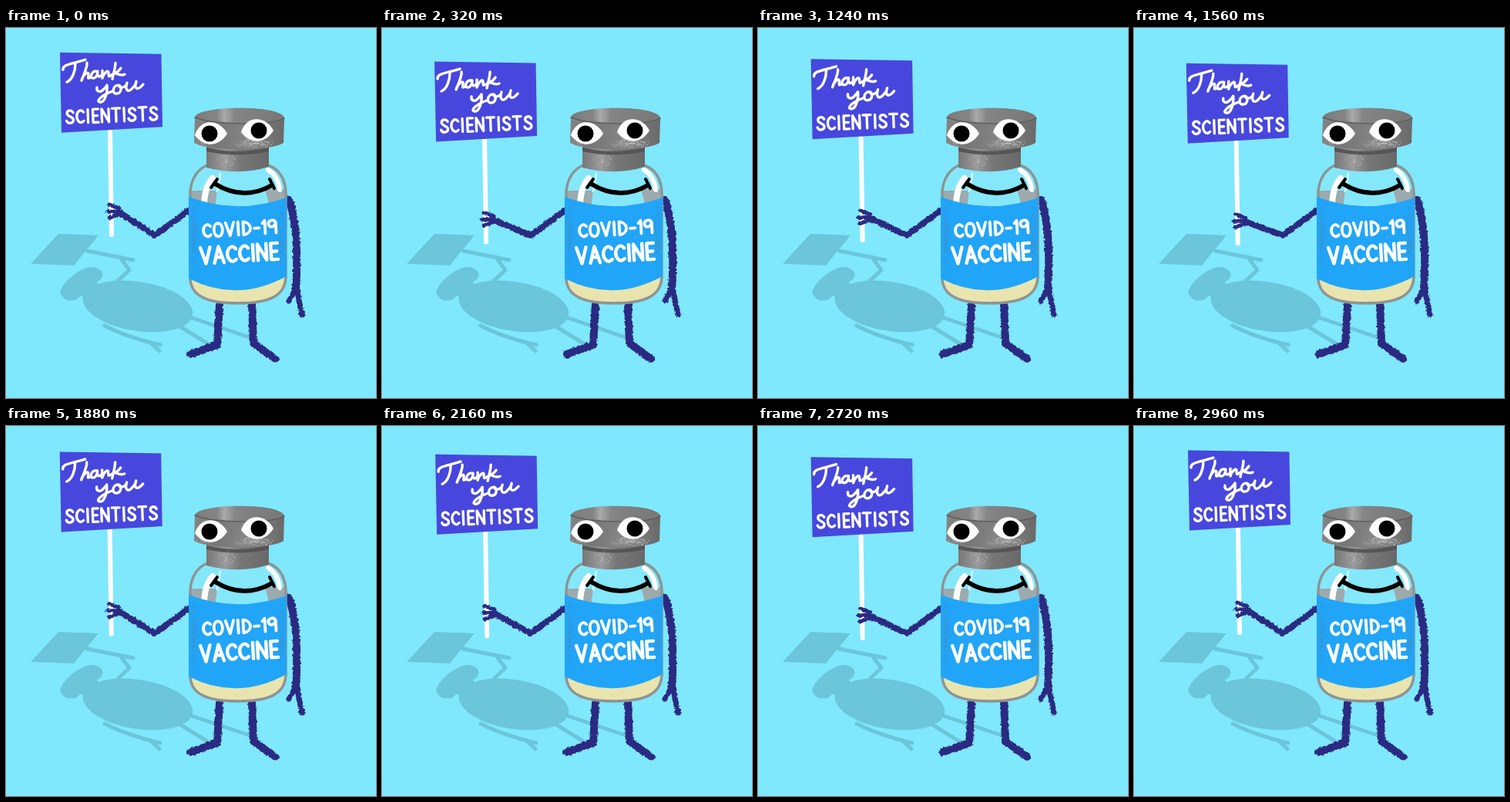
An HTML page for the animation above (3 s loop, 480 by 480 pixels).

```html
<!DOCTYPE html>
<html lang="en">
<head>
<meta charset="utf-8">
<title>Thank you scientists</title>
<style>
html, body { margin: 0; height: 100%; overflow: hidden; background: #7fe8fd; }
svg { display: block; width: 100%; height: 100%; }
.line { fill: none; stroke-linecap: round; stroke-linejoin: round; }
.ink { stroke: #2b2a82; stroke-width: 10; }
.white { stroke: #fff; stroke-width: 3.4; }
.shade { stroke: #6bc6db; stroke-width: 5; }
.letters path { vector-effect: non-scaling-stroke; }
</style>
</head>
<body>
<svg viewBox="0 0 480 480" role="img" aria-label="Thank you scientists. COVID-19 vaccine">
  <defs>
    <filter id="rough" filterUnits="userSpaceOnUse" x="0" y="0" width="480" height="480" color-interpolation-filters="sRGB">
      <feTurbulence id="noise" type="fractalNoise" baseFrequency=".3" numOctaves="2"/>
      <feDisplacementMap in="SourceGraphic" scale="4" xChannelSelector="R" yChannelSelector="G"/>
    </filter>
    <linearGradient id="metal">
      <stop stop-color="#858585"/><stop offset=".25" stop-color="#777"/>
      <stop offset=".6" stop-color="#858585"/><stop offset="1" stop-color="#696969"/>
    </linearGradient>
    <linearGradient id="top">
      <stop stop-color="#7c7c7c"/><stop offset=".25" stop-color="#858585"/>
      <stop offset=".33" stop-color="#aaa"/><stop offset=".45" stop-color="#858585"/>
      <stop offset="1" stop-color="#777"/>
    </linearGradient>
    <linearGradient id="neck">
      <stop stop-color="#777"/><stop offset=".3" stop-color="#999"/>
      <stop offset=".55" stop-color="#777"/><stop offset="1" stop-color="#686868"/>
    </linearGradient>
    <clipPath id="inside"><use href="#bottle"/></clipPath>
    <clipPath id="lids"><path id="lid" d="M-21 2C-14-20 10-20 21 0C10 18-10 18-21 2"/></clipPath>
    <path id="bottle" d="M261 178C249 183 240 195 239 213V325C240 348 261 357 301 357S362 348 363 323V213C362 195 354 183 340 178Z"/>
  </defs>

  <g class="line shade">
    <path d="M32 306 68 267 120 269 88 308ZM70 343C72 332 92 313 109 310C126 310 131 322 119 329C110 333 97 349 90 353Q74 356 70 343ZM92 342 117 329 126 338 103 352Z" fill="#6bc6db" stroke="none"/>
    <ellipse cx="171" cy="361" rx="72" ry="32" transform="rotate(9 171 361)" fill="#6bc6db" stroke="none"/>
    <path d="M105 289 165 301M149 299 160 314 145 328M128 386Q150 398 187 408L200 411M187 408 199 419M238 375 315 401M222 385 266 412"/>
  </g>

  <g class="line ink" filter="url(#rough)">
    <path d="M277 358 274 411 240 423M319 358 321 409 349 429"/>
    <path d="M367 223C377 250 379 290 376 340" stroke-width="10"/>
    <path d="M376 338 367 354M377 338 384 372" stroke-width="7" style="stroke-width:7"/>
    <path id="arm" style="stroke-width:8"/>
  </g>

  <use href="#bottle" fill="#85e7fa"/>
  <g clip-path="url(#inside)">
    <path d="M239 211H274L271 235H239ZM336 209H364V235H343Z" fill="#9caaad"/>
    <path d="M239 322Q300 352 363 320V358H239Z" fill="#e9e4ae"/>
    <path class="line" d="M268 195Q258 205 257 229" stroke="#fff" stroke-width="8"/>
    <path class="line" d="M340 184Q353 192 355 210" stroke="#fff" stroke-width="6"/>
    <path class="line" d="M278 189 274 212" stroke="#c8f6fc" stroke-width="3"/>
  </g>
  <use href="#bottle" fill="none" stroke="#8c9594" stroke-width="3.5"/>
  <path d="M237 219Q300 243 364 220V322Q300 357 237 325Z" fill="#20a5f9"/>
  <g id="labelGrain"></g>
  <g id="label" class="line letters" stroke="#fff"></g>

  <path d="M260 150H341V180Q302 192 260 181Z" fill="url(#neck)"/>
  <path d="M260 155Q300 165 341 155V160Q302 169 260 160Z" fill="#555"/>
  <path d="M245 116C247 101 358 99 361 117L360 149C344 160 264 161 244 149Z" fill="url(#metal)"/>
  <path d="M245 116C248 100 358 99 361 117C345 127 270 126 245 116Z" fill="url(#top)"/>
  <path class="line" d="M245 116C270 126 345 127 361 117" stroke="#5f5f5f" stroke-width="1.5"/>
  <g id="metalGrain"></g>

  <g id="eyes"></g>
  <path class="line" d="M271 202Q308 225 345 204" stroke="#000" stroke-width="6"/>
  <path class="line" d="M266 207 274 196M342 196 348 208" stroke="#000" stroke-width="4"/>

  <path id="stick" class="line" stroke="#fff" stroke-width="6"/>
  <g id="sign">
    <path d="M70 31.5 201.5 33.5 203 128 72 135.5Z" fill="#4747dd"/>
    <g class="line white">
      <path d="M74 54C73 47 84 47 103 41M90 46C90 56 86 67 79 70"/>
      <path d="M105 45C106 50 101 60 98 68C100 60 107 55 107 60S105 66 110 64"/>
      <path d="M118 56C111 55 108 65 113 65S119 58 119 56C118 62 120 65 124 61"/>
      <path d="M125 55V65C127 58 133 53 133 58S133 64 138 60"/>
      <path d="M142 45C142 52 139 60 138 66M149 52C146 57 142 58 140 59C144 57 146 63 154 60"/>
      <path d="M118 77C117 82 122 85 127 79Q130 76 131 74C132 84 128 97 122 96S124 87 138 82"/>
      <path d="M146 74C138 74 137 86 144 85S150 74 146 74C148 78 152 78 156 74"/>
      <path d="M157 71C154 80 158 84 163 79S169 70 169 69C166 79 170 82 178 73"/>
    </g>
    <g id="signWord" class="line letters white"></g>
  </g>
  <g id="hand" class="line ink" filter="url(#rough)">
    <path d="M134 229 147 234M132 238H148M134 246 148 241" style="stroke-width:5"/>
  </g>
</svg>
<script>
const $ = id => document.getElementById(id);

// Hand lettering: [advance, strokes] on a 20-unit cap height
const glyphs = {
  S: [9, "M9 4C7-1 1 0 1 5S9 10 9 15 2 22 0 16"],
  C: [9, "M9 4C5-3 0 4 0 10S4 23 9 17"],
  I: [2, "M1 0V20"],
  E: [8, "M8 0H1V20H8M1 10H7"],
  N: [9, "M0 20V0L9 20V0"],
  T: [10, "M0 0H10M5 0V20"],
  O: [10, "M5 0C-2 0-2 20 5 20S12 0 5 0"],
  V: [10, "M0 0 5 20 10 0"],
  D: [10, "M1 0V20C13 18 12 2 1 0Z"],
  A: [10, "M0 20 5 0 10 20M2 13H8"],
  "-": [6, "M0 11H6"],
  1: [3, "M0 4 3 0V20"],
  9: [9, "M9 4C7-2 0 0 0 6S8 12 9 4V20"]
};

function word(text, x, y, angle, sx, sy, gap, width) {
  let at = 0;
  const letters = [...text].map(c => {
    const [advance, d] = glyphs[c];
    const path = `<path d="${d}" transform="translate(${at}) scale(${sx} ${sy})"/>`;
    at += advance * sx + gap;
    return path;
  });
  return `<g transform="translate(${x} ${y}) rotate(${angle})" stroke-width="${width}">${letters.join("")}</g>`;
}

let seed = 7;
const random = () => (seed = seed * 16807 % 2147483647) / 2147483647;

// Soft cloud of brush grain
function grain(x, y, rx, ry, count, color) {
  let d = "";
  for (let i = 0; i < count; i++) {
    const a = random() * 2 * Math.PI, r = random();
    d += `M${(x + rx * r * Math.cos(a)).toFixed(1)} ${(y + ry * r * Math.sin(a)).toFixed(1)}h1`;
  }
  return `<path d="${d}" stroke="${color}"/>`;
}

$("label").innerHTML =
  word("COVID-19", 255.5, 254.5, -3.5, 1.05, .85, 4.6, 3.8) +
  word("VACCINE", 252, 285, -3.5, 1.25, 1.05, 4.8, 4.4);
$("signWord").innerHTML = word("SCIENTISTS", 78, 106.5, -2.2, 1, .86, 4.5, 3.3);
$("labelGrain").innerHTML =
  grain(243, 275, 5, 48, 220, "#3f8fc4") + grain(357, 278, 6, 48, 220, "#3f8fc4");
$("metalGrain").innerHTML =
  grain(322, 150, 26, 6, 190, "#b5b5b5") + grain(256, 148, 10, 7, 50, "#aaa") +
  grain(285, 172, 12, 10, 70, "#b0b0b0");
$("eyes").innerHTML = [[266, 137, -2], [326, 133, 2]].map(([x, y, look]) =>
  `<g transform="translate(${x} ${y})"><g clip-path="url(#lids)">
   <path d="M-24-20H24V20H-24Z" fill="#fff"/><circle cx="${look}" r="10.5"/></g></g>`).join("");

const blink = (t, middle, half) => Math.max(0, 1 - Math.abs(t - middle) / half);

function draw(now) {
  const t = now % 3000;
  const drop = ((1 - Math.cos(2 * Math.PI * (t / 1000 + .02))) / 2) ** .85;
  const dx = -2.4 * drop, dy = 13 * drop;
  $("sign").setAttribute("transform", `translate(${dx} ${15 * drop})`);
  $("hand").setAttribute("transform", `translate(${dx} ${dy})`);
  $("stick").setAttribute("d", `M${135 + dx} ${134 + 15 * drop}L${137 + dx} ${268 + 12 * drop}`);
  $("arm").setAttribute("d", `M237 237 193 269 ${147 + dx} ${239 + dy}`);

  const shut = Math.min(1, 1.25 * Math.max(blink(t, 730, 130), blink(t, 2530, 130)));
  $("lid").setAttribute("transform", `translate(0 ${shut}) scale(1 ${1 - .87 * shut})`);
  $("noise").setAttribute("seed", 1 + Math.floor(t / 120) % 3);
  requestAnimationFrame(draw);
}
requestAnimationFrame(draw);
</script>
</body>
</html>
```
